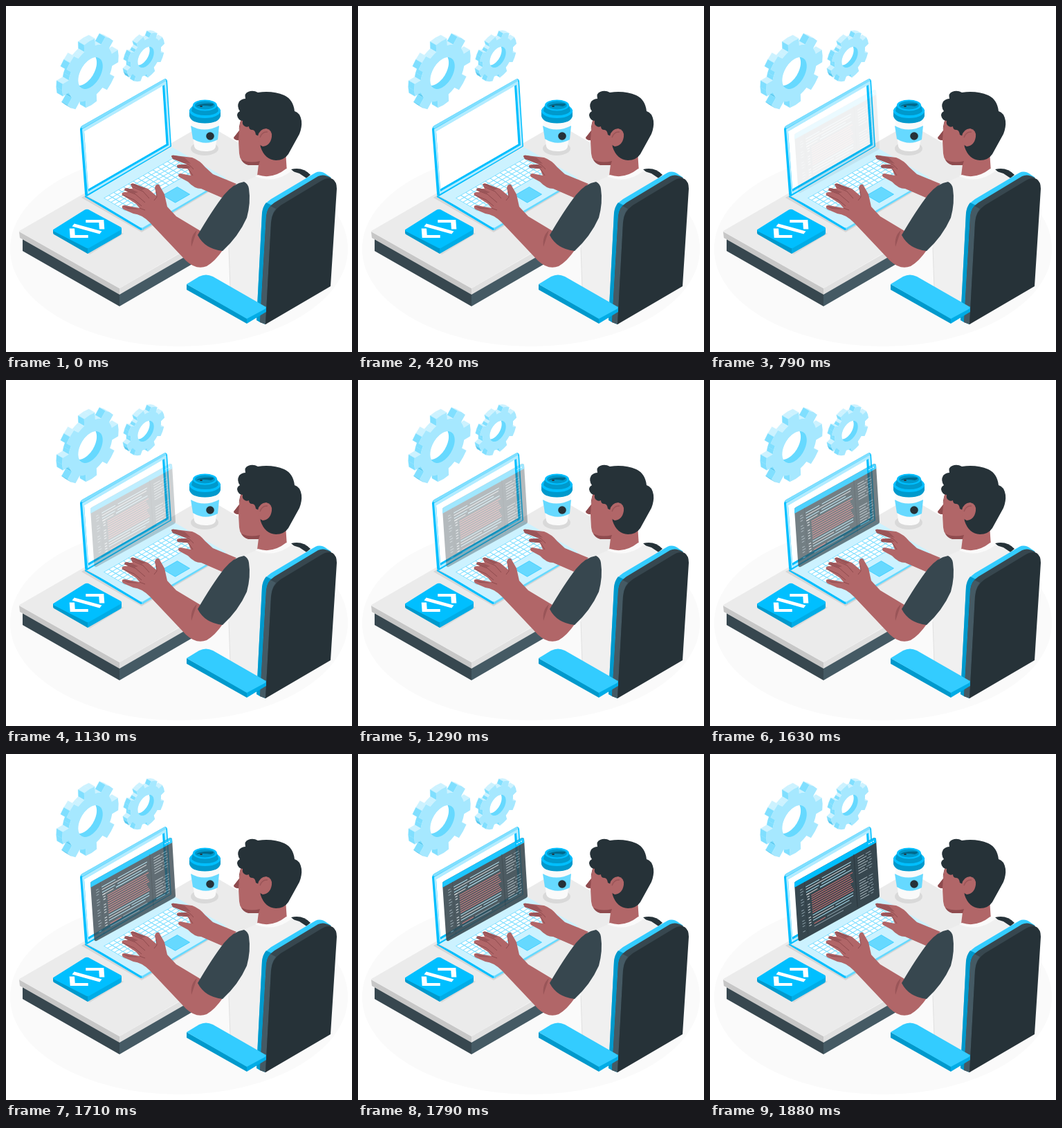
Write an HTML page that moves like this. It is 500 by 500 pixels and loops after 1.93 s.

```html
<!DOCTYPE html>
<html lang="en">
<head>
<meta charset="utf-8">
<title>Developer at a desk</title>
<style>
html, body { margin: 0; width: 100%; height: 100%; overflow: hidden; background: #fff; }
svg { display: block; width: 100%; height: 100%; }
</style>
</head>
<body>
<svg viewBox="0 0 500 500">
  <ellipse cx="250" cy="351" rx="244" ry="141" fill="#fafafa"/>

  <g id="gears"></g>

  <g id="desk">
    <path fill="#37474f" d="M24 337 164 415V434L24 354Z"/>
    <path fill="#455a64" d="M164 415 300 336V355L164 434Z"/>
    <path fill="#c7c7c7" d="M19 326 164 408V417L20 335Z"/>
    <path fill="#e0e0e0" d="M164 408 420 260V269L164 417Z"/>
    <path fill="#ebebeb" d="M19 326 Q19 325 21 324L286 171Q288 170 290 171L430 252 164 408Z"/>
  </g>

  <g id="book">
    <path fill="#d9d9d9" d="M74 331 119 302 170 329 121 359Z"/>
    <path fill="#0099cc" d="M68 323V328Q68 330 71 331L118 358V349Z"/>
    <path fill="#00ace6" d="M118 349V358L165 331Q167 330 167 328V321Z"/>
    <path fill="#00bfff" d="M70 322 113 295Q116 293 119 294L165 319Q169 321 165 324L121 349Q118 351 115 349L70 326Q66 324 70 322Z"/>
    <g transform="matrix(.866 -.5 .866 .5 117 322)" fill="none" stroke="#fff" stroke-width="6">
      <path d="M-12-13-23-1-10 12M12 13 23 1 10-12M-6-17 6 17"/>
    </g>
  </g>

  <g id="cup">
    <ellipse cx="287" cy="206" rx="20" ry="10" fill="#d9d9d9"/>
    <path fill="#fafafa" d="M267 162 272 203Q274 210 288 210T303 203L309 162Z"/>
    <path fill="#66d9ff" d="M267 173Q286 184 308 173L306 193Q288 203 270 192Z"/>
    <circle cx="295" cy="188" r="5.800" fill="#263238"/>
    <path fill="#0099cc" d="M265 150V159Q267 169 287.500 169.500 308 169 310 159V150Z"/>
    <ellipse cx="287.500" cy="151.500" rx="22.500" ry="10.500" fill="#00bfff"/>
    <path fill="#0099cc" d="M270 143 268 152Q274 158 288 158T307 152L305 143Z"/>
    <ellipse cx="287.500" cy="143.500" rx="17.500" ry="8" fill="#00bfff"/>
    <ellipse cx="287.500" cy="143.500" rx="14.500" ry="6" fill="#0099cc"/>
    <path fill="#006b8f" d="M275 145Q280 140 299 141 302 143 296 145 286 143 275 145Z"/>
    <ellipse cx="282" cy="145" rx="2" ry="1" fill="#263238"/>
  </g>

  <g id="laptop">
    <path fill="#d6d6d6" d="M109 277 117 272 200 322 318 250 321 252 196 327Z"/>
    <path fill="#00bfff" d="M114 274V276L193 323Q196 325 199 323V318Z"/>
    <path fill="#66d9ff" d="M196 318V324Q198 324 199 323L317 253V249Z"/>
    <path fill="#ccf2ff" d="M117 274 240 204 317 248Q318 250 316 251L198 320Q196 321 194 320Z"/>
    <g id="keys" transform="matrix(1.23 -.71 .78 .46 117 275)"></g>
    <path fill="#00bfff" d="M107 178Q107 175 110 173L228 106Q232 104 233 108L239 203 117 275Q114 275 114 271Z"/>
    <path fill="#b3ecff" d="M110 178 230 108.500 231.500 109 237.500 202.500 118 272Z"/>
    <path fill="#80dfff" d="M108 176 110 173 228 106Q231 105 232 108L111 177Z"/>
    <path fill="#00bfff" d="M113 181 229 114 235 201 119 268Z"/>
    <path fill="#fff" d="M113 181 226 115.500 231.500 199.500 119 264.500Z"/>
  </g>

  <g id="win" opacity="0">
    <path fill="#37474f" d="M122 187Q122 185 124 184L236 121.500Q239 120 240 123L245 205Q245 207 243 208L131 270Q128 271 127.500 268Z"/>
    <path fill="#00bfff" d="M122 193V187Q122 185 124 184L236 121.500Q239 120 240 123L240.300 128Z"/>
    <g id="code" transform="matrix(1.17 -.65 .06 .84 122 186)"></g>
  </g>

  <g id="far-arm">
    <path fill="#b16668" d="M239 217Q240 215 244 216L269 219Q280 223 288 233L299 243 333 257 312 277 282 264Q272 264 263 254L250 247Q247 243 252 242L267 245 263 235 248 233Q245 230 250 229L262 229 241 221Z"/>
    <path fill="none" stroke="#8f4b4e" d="M241 220 264 229Q268 232 271 236M249 232 263 235Q267 240 270 245"/>
    <path fill="#9a5558" d="M239 217Q240 215 244 216L258 219 267 228 241 221ZM247 231 259 229 267 233 260 235 248 234Z"/>
  </g>

  <g id="head">
    <path fill="#b16668" d="M340 160 337 180 329 191Q331 194 336 194L337 213Q338 225 349 229L365 229 363 245Q383 255 406 240L404 210 380 160Z"/>
    <path fill="#8f4b4e" d="M340 163Q336 174 337 180L329 190Q330 194 336 194L337 180 340 163ZM340 222Q352 228 367 224L365 230H350Q343 228 340 222Z"/>
  </g>

  <g id="body">
    <path fill="#263238" d="M412 236Q429 232 440 244L430 252Z"/>
    <path fill="#f0f0f0" d="M343 254 364 245Q385 251 405 236L424 242 436 250 390 300 366 433 324 408 322 345Z"/>
    <path fill="#fafafa" d="M364 244Q385 251 405 235L413 238Q388 258 360 246Z"/>
    <path fill="none" stroke="#e0e0e0" d="M322 349 324 407"/>
    <path fill="#263238" d="M361 186Q360 179 356 179 351 179 351 174 347 176 344 173 341 171 342 166 335 165 334 158 334 154 338 152 333 145 337 138 341 134 346 134 344 126 350 124 357 121 364 125 385 122 402 129 415 135 417 152 425 154 427 166 428 175 424 185L408 214Q402 223 390 223 374 222 368 204L365 188Z"/>
    <path fill="#b16668" d="M364 188Q366 178 376 177 385 179 384 189 382 202 371 203 363 201 364 188Z"/>
    <path fill="none" stroke="#9a5558" stroke-width="1.500" d="M367 190Q370 181 378 182"/>
  </g>

  <g id="near-arm">
    <path fill="#b16668" d="M168 289Q170 287 177 289L193 292 188 286 168 273Q166 270 171 269L176 269 171 265Q172 262 178 264L183 264 180 258Q182 255 188 258L205 264 218 275 215 263Q216 257 221 258L229 272 233 290 246 304 281 325 313 353Q302 369 290 376 275 382 260 368L208 313Q196 301 184 300L170 294Q167 292 168 289Z"/>
    <path fill="none" stroke="#8f4b4e" d="M182 261 198 268 207 278M171 266 187 272 201 284M168 273 185 280 196 289M193 292 201 295M217 268 218 276 214 281"/>
    <path fill="#9a5558" d="M180 258Q182 255 188 258L202 264 196 266ZM171 265Q172 262 178 264L191 269 185 271ZM168 289 185 292 193 294 176 293ZM276 324Q266 332 268 348 271 339 273 333Z"/>
    <path fill="#37474f" d="M344 254Q329 256 315 273 298 295 277 331 287 351 313 354 336 333 348 306 354 284 351 264 350 257 344 254Z"/>
  </g>

  <g id="chair">
    <path fill="#33ccff" d="M362 454 370 299Q372 286 383 279L447 241Q455 237 464 244L470 248 390 310 374 460Z"/>
    <path fill="#0099cc" d="M362 454 370 299Q371 290 376 284L384 288Q377 294 376 303L367 457Z"/>
    <path fill="#37474f" d="M367 457 376 304Q377 291 388 284L451 246Q459 242 469 248L473 253 390 310 376 460Z"/>
    <path fill="#455a64" d="M367 457 376 304Q377 295 382 289L390 293Q384 300 383 313L375 460Z"/>
    <path fill="#263238" d="M375 460 383 313Q384 297 397 288L455 253Q464 247 472 250 478 254 478 264L469 405Z"/>
    <path fill="#0099cc" d="M261 402V410L348 459V451Z"/>
    <path fill="#00ace6" d="M348 451V459L376 442V434Z"/>
    <path fill="#33ccff" d="M261 402 279 391Q289 386 299 391L374 434Q377 436 374 438L348 452Z"/>
  </g>
</svg>
<script>
const $ = id => document.getElementById(id);
const NS = 'http://www.w3.org/2000/svg';

function add(parent, tag, attrs) {
  const el = document.createElementNS(NS, tag);
  for (const k in attrs) el.setAttribute(k, attrs[k]);
  parent.append(el);
  return el;
}
const rect = (parent, x, y, width, height, fill) => add(parent, 'rect', { x, y, width, height, fill });

// Extruded cog standing in the isometric plane that rises to the right
function gear(cx, cy, outer, inner, hole, turn, depth) {
  const g = $('gears');
  const ox = -.866 * depth, oy = -.5 * depth;
  const at = (r, deg) => {
    const a = deg * Math.PI / 180, x = r * Math.cos(a), y = r * Math.sin(a);
    return [cx + .866 * x, cy - .5 * x - y];
  };
  const back = ([x, y]) => [x + ox, y + oy];
  const path = pts => 'M' + pts.map(p => p.map(n => n.toFixed(2)).join(' ')).join('L') + 'Z';
  const rim = [], ring = [];
  for (let k = 0; k < 8; k++) {
    const a = turn + k * 45;
    rim.push(at(inner, a - 14), at(outer, a - 11), at(outer, a), at(outer, a + 11), at(inner, a + 14), at(inner, a + 22.5));
  }
  for (let a = 0; a < 360; a += 6) ring.push(at(hole, a));

  const id = 'hole' + depth;
  const clip = add(g, 'clipPath', { id });
  add(clip, 'path', { d: path(ring) });

  // Only the walls that face up or left can be seen
  rim.forEach((p, i) => {
    const q = rim[(i + 1) % rim.length];
    const dx = q[0] - p[0], dy = q[1] - p[1];
    if (dx * oy - dy * ox < 0) return;
    const fill = dx < 0 && dy < -dx * 1.6 ? '#ccf2ff' : dx > 2 ? '#59c9ef' : '#80dfff';
    add(g, 'path', { d: path([p, q, back(q), back(p)]), fill, stroke: fill, 'stroke-width': .3 });
  });
  add(g, 'path', { d: path(rim), fill: '#a6e8ff' });
  add(g, 'path', { d: path(ring), fill: '#66d9ff' });
  add(g, 'path', { d: path(ring.map(back)), fill: '#fff', 'clip-path': `url(#${id})` });
}

function keyboard() {
  const g = $('keys');
  rect(g, 8, 18, 81, 40, '#80dfff');
  for (let r = 0; r < 6; r++) {
    const y = 19 + r * 6.5;
    for (let k = 0; k < 14; k++) {
      if (r === 5 && k > 3 && k < 9) continue;
      rect(g, 8.7 + k * 5.75, y, 4.8, 5.2, '#fff');
    }
  }
  rect(g, 31.7, 51.5, 27.8, 5.2, '#fff');
  add(g, 'rect', { x: 46, y: 68, width: 17, height: 23, fill: '#66d9ff', stroke: '#33ccff', 'stroke-width': .6 });
}

function editor() {
  const g = $('code');
  rect(g, 72.5, 8, .8, 90, '#2b383f');
  rect(g, 11.5, 8, .6, 90, '#2f3d44');
  for (let k = 0; k < 3; k++) add(g, 'circle', { cx: 92 + k * 2.6, cy: 4, r: .9, fill: '#fff' });

  for (let k = 0; k < 17; k++) {
    const y = 17 + k * 4.5;
    if (k % 4 !== 3) rect(g, 6, y, 3 + k % 2, 1.2, '#90a4ae');
    if (k > 2 && k % 5 !== 1) rect(g, 14, y, 2.8, 1.4, '#cfd8dc');
  }
  const row = (x, y, end, fill) => rect(g, x, y, end - x, 1.2, fill);
  const pale = '#b3ecff', red = '#e57373';
  row(13, 17, 30, pale);
  row(33, 17, 69, pale);
  row(13, 21.5, 68, '#e0e0e0');
  row(13, 26, 29, pale);
  row(32, 26, 62, pale);
  row(13, 30.5, 27, '#e0e0e0');
  row(30, 30.5, 69, pale);
  for (let k = 0; k < 9; k++) row(19, 36 + k * 3.7, 70 - k * 7 % 4, red);
  row(19, 70, 69, pale);
  row(19, 74.5, 45, '#e0e0e0');
  row(47, 74.5, 69, pale);
  row(19, 79, 64, pale);
  row(20, 85, 34, red);
  row(36, 85, 66, '#90a4ae');
  row(20, 90, 56, '#90a4ae');

  for (let k = 0; k < 17; k++) {
    if (k === 7 || k === 8) continue;
    row(77, 17 + k * 4.4, 85 + k * 3 % 5, '#b0bec5');
    row(87 + k * 3 % 5, 17 + k * 4.4, 93 + k % 2, '#90a4ae');
  }
}

gear(122, 97, 47, 37, 20.5, 2, 10);
gear(202, 74, 31.5, 25.5, 13.5, 18, 7);
keyboard();
editor();

const LOOP = 1930, START = 380, FADE = 1500;
function draw(now) {
  const p = Math.min(1, Math.max(0, (now % LOOP - START) / FADE));
  $('win').setAttribute('opacity', p * p);
}
const begin = performance.now();
function tick() {
  draw(performance.now() - begin);
  requestAnimationFrame(tick);
}
draw(0);
requestAnimationFrame(tick);
</script>
</body>
</html>
```
